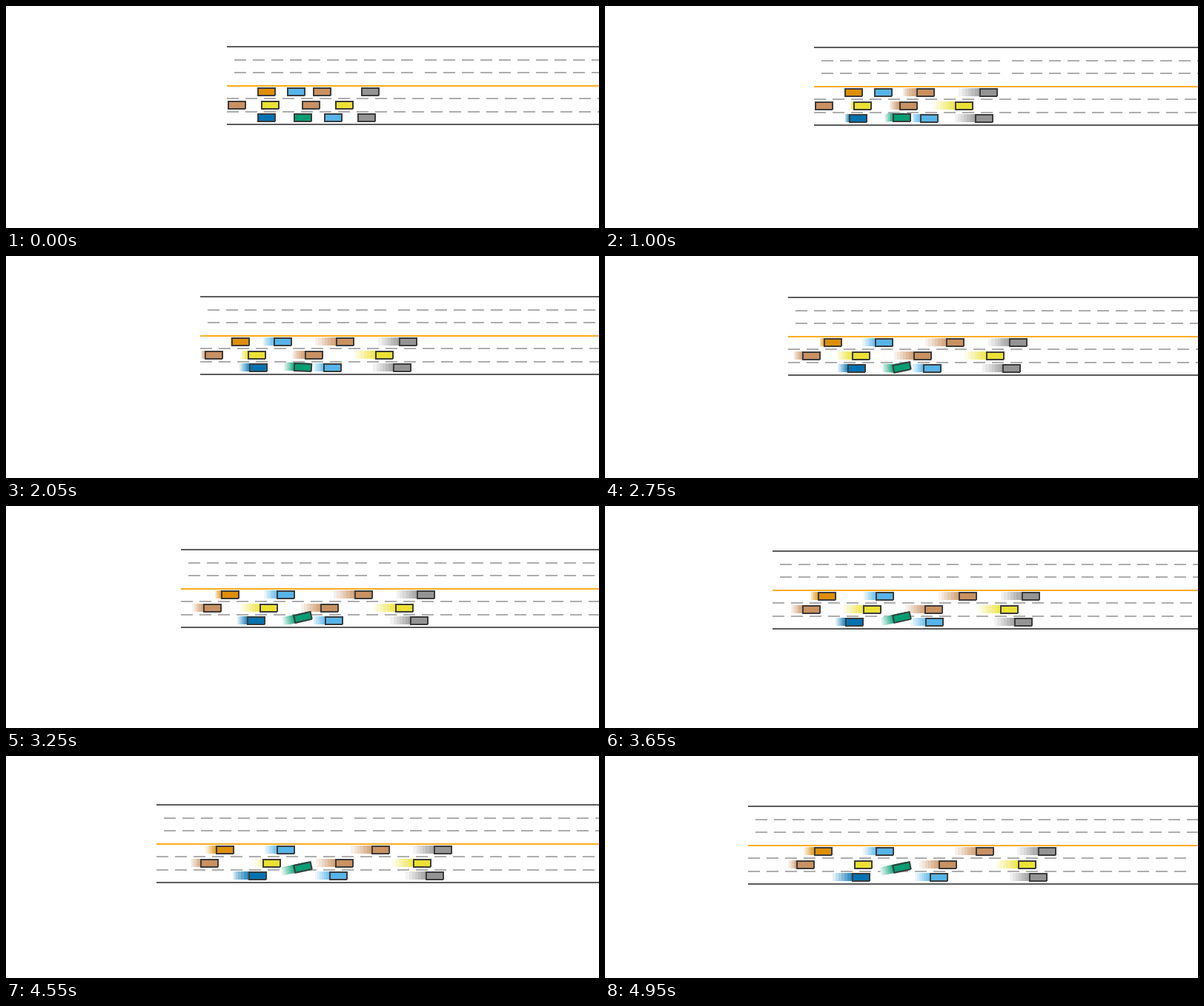
An HTML page with a canvas for the animation above (5 s loop, 800x300 px).

```html
<!DOCTYPE html>
<html lang="en">
<head>
<meta charset="utf-8">
<title>Lane change</title>
<style>
  html, body { margin: 0; width: 100%; height: 100%; overflow: hidden; background: #fff; }
  canvas { display: block; width: 800px; height: 300px; }
</style>
</head>
<body>
<canvas id="stage" width="800" height="300"></canvas>
<script>
const ctx = document.getElementById('stage').getContext('2d');
const LOOP = 5, TICK = 0.05;
const GHOSTS = 7, GHOST_GAP = 0.1;
const CAR_W = 25, CAR_H = 12, LANE = 17.5;
const MIN_TILT = 2 * Math.PI / 180;

const ORANGE = [222, 143, 5], SKY = [86, 180, 233], TAN = [202, 145, 97],
      GRAY = [148, 148, 148], YELLOW = [236, 225, 51],
      BLUE = [1, 115, 178], GREEN = [2, 158, 115];

// Position over time: start at x with speed v, then change the speed
// evenly between `from` and `to` (seconds) for each [from, to, speed]
const drive = (x, v, ...ramps) => t => {
  let pos = x + v * t, speed = v;
  for (const [from, to, next] of ramps) {
    const dt = Math.min(Math.max(t - from, 0), to - from);
    pos += (next - speed) * (dt * dt / 2 / (to - from) + Math.max(t - to, 0));
    speed = next;
  }
  return pos;
};

// The camera follows the green car, which pulls out of its lane
const ahead = drive(0, 16, [0.5, 4, 25.6]);
const aside = drive(0, 0, [0, 0.3, 1.8], [0.3, 0.8, 0], [1.2, 1.6, -0.8], [2.2, 2.84, 5.45]);
const roadX = t => 298 - ahead(t);

function heading(t) {
  const change = f => f(t + TICK) - f(t - TICK);
  const angle = -Math.atan2(change(aside), change(ahead));
  return Math.abs(angle) < MIN_TILT ? 0 : angle;
}

const car = (color, lane, along) => ({
  color,
  pose: (now, then) => ({
    x: Math.round(roadX(now) + along(then)),
    y: Math.round(110 + lane * LANE) + Math.round(aside(now)),
    angle: 0
  })
});

const cars = [
  car(ORANGE, 0, drive(41, 0, [1.45, 4, 21.5])),
  car(SKY,    0, drive(81, 0, [0.85, 1.83, 25.2])),
  car(TAN,    0, drive(116, 12, [0.4, 0.95, 42.8])),
  car(GRAY,   0, drive(181, 42.4)),
  car(TAN,    1, drive(1, 0, [1.2, 2.73, 23], [4.15, 4.95, 11.5])),
  car(YELLOW, 1, drive(46, 7, [1.49, 2.75, 40], [4.15, 4.2, 0])),
  car(TAN,    1, drive(101, 5, [0.3, 0.65, 22], [1.7, 2.1, 40])),
  car(YELLOW, 1, drive(146, 44)),
  car(BLUE,   2, drive(41, 2, [0.1, 1.7, 20], [4, 4.3, 41])),
  car(SKY,    2, drive(131, 2, [0.2, 0.8, 22], [2.8, 3.3, 30])),
  car(GRAY,   2, drive(176, 41.1)),
  {
    color: GREEN,
    pose(now, then) {
      const angle = heading(then), snap = angle ? n => n : Math.round;
      return {
        x: snap(388 + ahead(then) - ahead(now)),
        y: snap(144.5 + aside(now) - aside(then)),
        angle
      };
    }
  }
];

const tint = (rgb, k) => `rgb(${rgb.map(c => Math.round(255 + (c - 255) * k))})`;

function place({ x, y, angle }, draw) {
  ctx.save();
  ctx.translate(x + CAR_W / 2, y + CAR_H / 2);
  ctx.rotate(angle);
  ctx.translate(-CAR_W / 2, -CAR_H / 2);
  draw();
  ctx.restore();
}

// Paler copies of the body at its recent places, oldest first
function drawTrail({ color, pose }, t) {
  for (let k = GHOSTS; k > 0; k--) {
    const then = t - (k - 0.5) * GHOST_GAP;
    if (then < -1e-6) continue;
    ctx.fillStyle = tint(color, 1 - k / (GHOSTS + 1));
    place(pose(t, then), () => ctx.fillRect(0, 0, CAR_W - 1, CAR_H - 1));
  }
}

function drawCar({ color, pose }, t) {
  place(pose(t, t), () => {
    const r = CAR_W - 1, b = CAR_H - 1;
    ctx.fillStyle = tint(color, 1);
    ctx.fillRect(1, 1, r - 1, b - 1);
    ctx.strokeStyle = '#3c3c3c';
    ctx.lineWidth = 2;
    ctx.beginPath();
    ctx.moveTo(r, b);
    ctx.lineTo(1, b);
    ctx.lineTo(1, 1);
    ctx.lineTo(r, 1);
    ctx.lineTo(r, b);
    ctx.stroke();
  });
}

function solid(x, y, color) {
  ctx.fillStyle = color;
  ctx.fillRect(x, y, 800 - x, 2);
}

function dashes(x, y, count) {
  ctx.fillStyle = '#aeaeae';
  for (let i = 0; i < count; i++) ctx.fillRect(x + i * 25, y, 16, 2);
}

function drawRoad(t) {
  const x = Math.round(roadX(t)), dy = Math.round(aside(t));
  const lineY = i => Math.floor(54.5 + LANE * i) + dy;
  solid(x, lineY(0), '#5c5c5c');
  for (const i of [1, 2]) {
    dashes(x + 10, lineY(i), 10);
    dashes(x + 267, lineY(i), 24);
  }
  solid(x, lineY(3), '#ffac22');
  for (const i of [4, 5]) dashes(x, lineY(i), 24);
  solid(x, lineY(6), '#5c5c5c');
}

const start = performance.now();
function render(now) {
  const elapsed = Math.max(0, now - start) / 1000 % LOOP;
  const t = Math.floor(elapsed / TICK + 1e-6) * TICK;
  ctx.fillStyle = '#fff';
  ctx.fillRect(0, 0, 800, 300);
  drawRoad(t);
  for (const c of cars) drawTrail(c, t);
  for (const c of cars) drawCar(c, t);
  requestAnimationFrame(render);
}
render(start);
</script>
</body>
</html>
```
